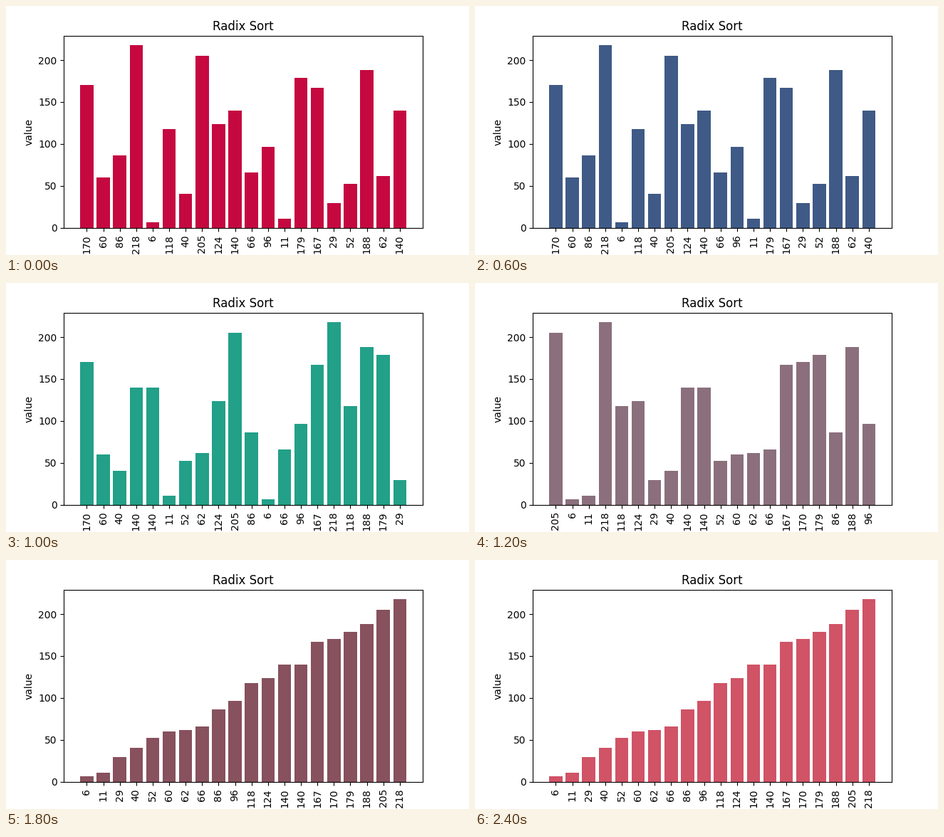
Recreate the animation shown at these times as a matplotlib script. Size 650 by 350 pixels, loop 2600 ms.

```python
import matplotlib.pyplot as plt
from matplotlib.animation import FuncAnimation

VALUES = [170, 60, 86, 218, 6, 118, 40, 205, 124, 140,
          66, 96, 11, 179, 167, 29, 52, 188, 62, 140]
COLORS = ["#c50840", "#8a3f6b", "#5b2189", "#3f5a86", "#205c65", "#22a088", "#8b6f7c",
          "#fc2d6b", "#b5486a", "#87515d", "#9a6258", "#b25a72", "#d05366"]
FIRST_PASS = 5


def radix_passes(values):
    """Return the list before sorting and after each digit pass."""
    passes = [list(values)]
    base = 1
    while base <= max(values):
        passes.append(sorted(passes[-1], key=lambda v: v // base % 10))
        base *= 10
    return passes


PASSES = radix_passes(VALUES)

fig, ax = plt.subplots(figsize=(6.5, 3.5), dpi=100)
ax.set_title("Radix Sort")
ax.set_ylabel("value")
positions = range(len(VALUES))
bars = ax.bar(positions, VALUES, width=0.8)
ax.set_xlim(-1.39, len(VALUES) + 0.39)
ax.set_ylim(0, max(VALUES) * 1.05)
ax.set_xticks(positions)


def update(frame):
    step = min(max(frame - FIRST_PASS + 1, 0), len(PASSES) - 1)
    values = PASSES[step]
    for bar, value in zip(bars, values):
        bar.set_height(value)
        bar.set_facecolor(COLORS[frame])
    ax.set_xticklabels(values, rotation=90)
    return bars


anim = FuncAnimation(fig, update, frames=len(COLORS), interval=200,
                     repeat=True, repeat_delay=0, blit=False)
plt.show()
```
